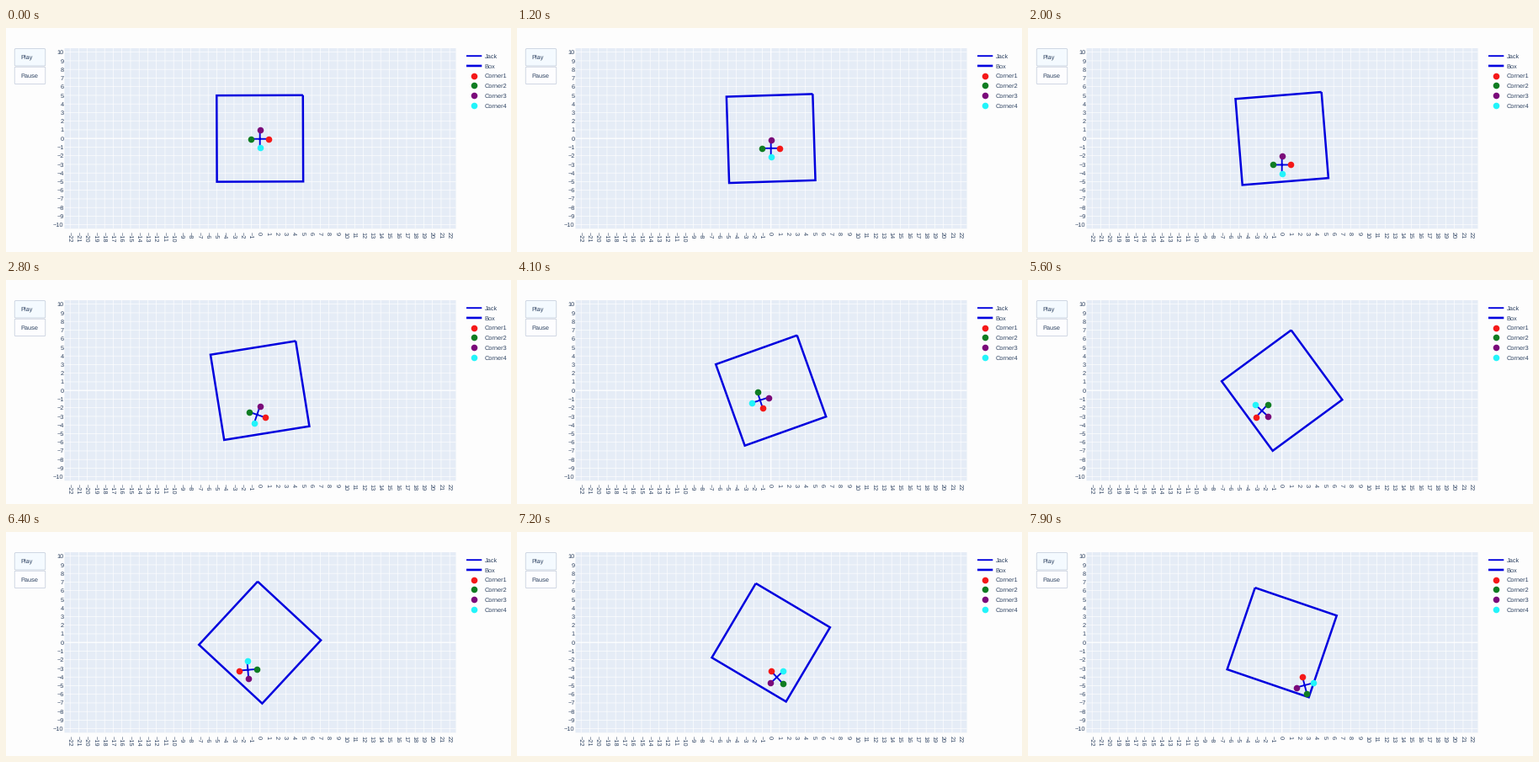
Animation of 600x266 px, one loop 8000 ms. Source, as a matplotlib script:

```python
import numpy as np
import matplotlib
import matplotlib.pyplot as plt
from matplotlib.animation import FuncAnimation
from matplotlib.patches import FancyBboxPatch, Rectangle

matplotlib.rcParams["font.family"] = "Liberation Sans"
matplotlib.rcParams["text.hinting"] = "none"

W, H, DPI = 600, 266, 100
PX = 72 / DPI                      # points per pixel
X0, Y0, UNIT = 301.7, 131.2, 10.25  # data origin and scale in pixels
LEFT, RIGHT, TOP, BOTTOM = 69.5, 534.5, 24, 238.3
FRAMES, STEP = 80, 100

INK, PAPER, PLOT = "#2a3f5f", "#fdfdfd", "#e5ecf6"
BLUE = "#0000de"
CORNERS = {"Corner1": "#f51818", "Corner2": "#0f7d22",
           "Corner3": "#7a0a7a", "Corner4": "#22f4fa"}
TIP_TURN = np.radians([0, 180, 90, 270])
BOX = 5 * np.array([[1, 1], [-1, 1], [-1, -1], [1, -1], [1, 1]])

GRAVITY = 1.5
# Free flights between impacts: start, x, y, vx, vy, angle, spin
FLIGHTS = [
    (0.00, 0.0, -0.05, 0.0, 0.0, 0.0, 0.0),
    (2.33, 0.0, -4.03, -0.71, 2.967, 0.0, -40.5),
    (5.95, -2.57, -3.117, 2.602, 0.215, -146.6, -63.9),
    (7.77, 2.165, -5.21, 3.6, 2.05, -262.9, 59.0),
]

fig = plt.figure(figsize=(W / DPI, H / DPI), dpi=DPI, facecolor=PAPER)
ax = fig.add_axes([0, 0, 1, 1])
ax.set_xlim(0, W)
ax.set_ylim(H, 0)
ax.axis("off")


def label(x, y, text, **kw):
    ax.text(x, y, text, color=INK, fontsize=7.35 * PX, va="baseline",
            rotation_mode="anchor", **kw)


def rule(xs, ys, color, width, z=1):
    return ax.plot(xs, ys, color=color, lw=width * PX, zorder=z, snap=False,
                   solid_capstyle="butt", solid_joinstyle="miter")[0]


def dot(x, y, color, z=6):
    return ax.plot([x], [y], "o", color=color, ms=7.6 * PX, mew=0,
                   zorder=z, snap=False)[0]


def number(n):
    return str(n).replace("-", "\u2212")


def button(y, text, fill):
    ax.add_patch(FancyBboxPatch((10.2, y), 36.6, 20.4, fc=fill, ec="#bec8d9",
                                lw=0.7 * PX, snap=False,
                                boxstyle="round,pad=0,rounding_size=1.3"))
    label(17.5, y + 12.4, text)


def draw_static():
    ax.add_patch(Rectangle((LEFT, TOP), RIGHT - LEFT, BOTTOM - TOP,
                           fc=PLOT, lw=0, zorder=0, snap=False))
    for n in range(-22, 23):
        x = X0 + n * UNIT
        rule([x, x], [TOP, BOTTOM], "white", 0.65 if n else 1.25)
        label(x - 2.6, 242, number(n), rotation=270)
    for n in range(-10, 11):
        y = Y0 - n * UNIT
        rule([LEFT, RIGHT], [y, y], "white", 0.65 if n else 1.25)
        label(68.6, y + 2.5, number(n), ha="right")

    button(24.6, "Play", "#f4faff")
    button(46.2, "Pause", "#fdfdff")

    for i, name in enumerate(["Jack", "Box", *CORNERS]):
        y = 33.2 + 11.75 * i
        label(568.7, y + 2.7, name)
        if name in CORNERS:
            dot(556, y, CORNERS[name])
        else:
            rule([547, 565.3], [y, y], BLUE, 1.9 if name == "Jack" else 2.6)


def box_angle(t):
    s = t - 2.33
    return 0.2 + 1.1 * t * t if s < 0 else 6.2 + 5.7 * s + 1.07 * s * s


def jack_pose(t):
    start, x, y, vx, vy, angle, spin = [f for f in FLIGHTS if f[0] <= t][-1]
    s = t - start
    return x + vx * s, y + vy * s - GRAVITY * s * s / 2, angle + spin * s


draw_static()
jack = rule([], [], BLUE, 1.9, 4)
box = rule([], [], BLUE, 2.5, 5)
tips = [dot(0, 0, c, 6 + i) for i, c in enumerate(CORNERS.values())]


def update(i):
    t = i * STEP / 1000

    a = np.radians(box_angle(t))
    c, s = np.cos(a), np.sin(a)
    bx, by = BOX[:, 0], BOX[:, 1]
    box.set_data(X0 + UNIT * (c * bx - s * by), Y0 - UNIT * (s * bx + c * by))

    x, y, angle = jack_pose(t)
    turn = np.radians(angle) + TIP_TURN
    tx = X0 + UNIT * (x + np.cos(turn))
    ty = Y0 - UNIT * (y + np.sin(turn))
    jack.set_data(np.insert(tx, 2, np.nan), np.insert(ty, 2, np.nan))
    for tip, px, py in zip(tips, tx, ty):
        tip.set_data([px], [py])
    return [jack, box, *tips]


anim = FuncAnimation(fig, update, frames=FRAMES, interval=STEP,
                     repeat=True, repeat_delay=0, blit=False)
plt.show()
```
